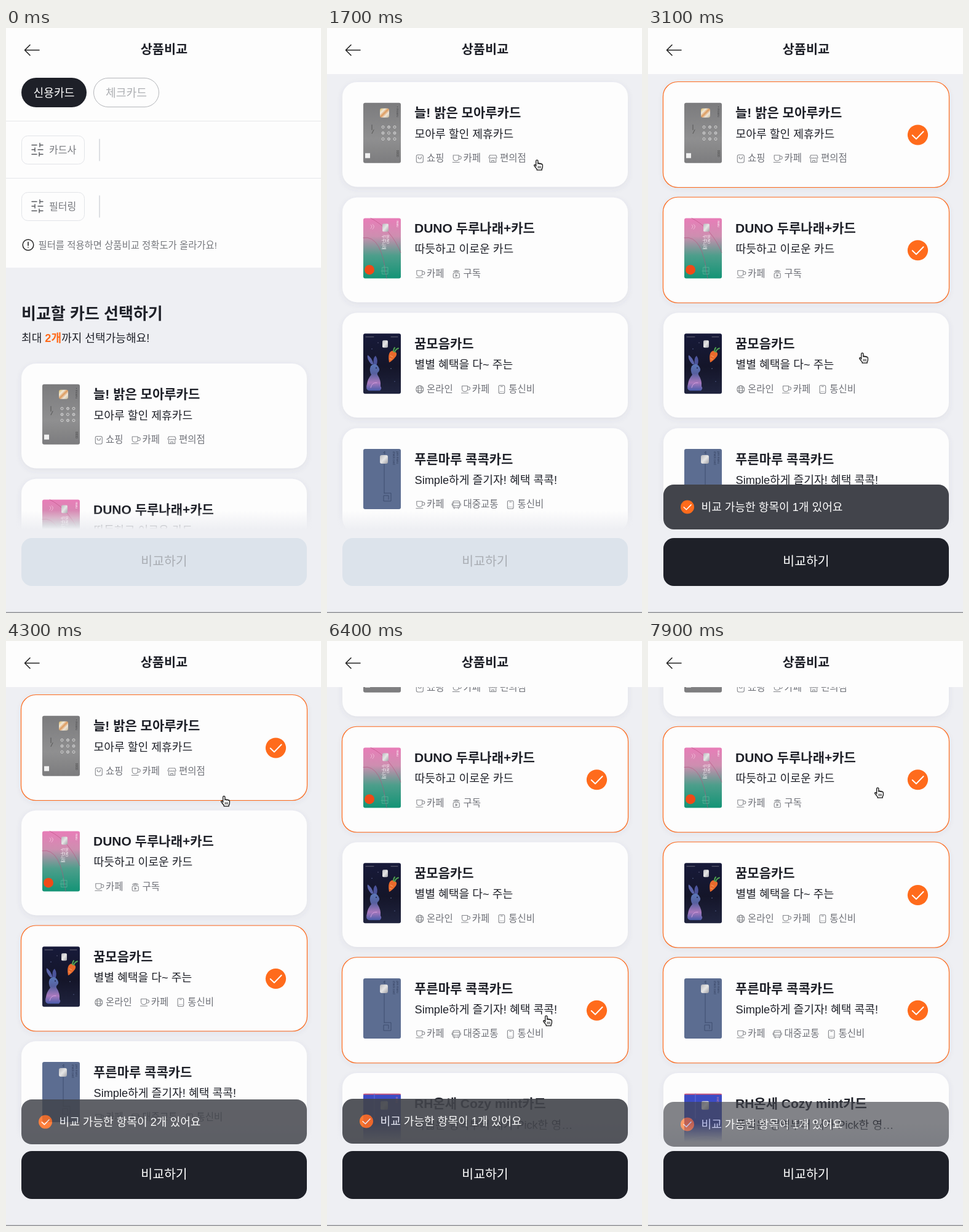
These frames come from a looping animation (512x952 px, 8000 ms). An HTML page:

```html
<!DOCTYPE html>
<html lang="ko">
<head>
<meta charset="utf-8">
<style>
html, body { margin: 0; width: 100%; height: 100%; overflow: hidden; background: #eeeff3; }
svg { display: block; width: 100vw; height: 100vh; }
text { font-family: "Liberation Sans", "Noto Sans CJK KR", "Noto Sans CJK", sans-serif; white-space: pre; }
.icon { fill: none; stroke: #85878c; stroke-width: 1.1; stroke-linecap: round; stroke-linejoin: round; }
</style>
</head>
<body>
<svg id="stage" viewBox="0 0 512 952" preserveAspectRatio="none"></svg>
<script>
const LOOP = 8000, ORANGE = '#ff6b1c', INK = '#1e2028', WHITE = '#fdfdfd', GRAY = '#eeeff3';
const CARD_TOP = 546, PITCH = 187.75;

// Text placed by its vertical centre.
const text = (x, cy, size, body, fill = INK, extra = '') =>
  `<text x="${x}" y="${cy + size * 0.37}" font-size="${size}" fill="${fill}" ${extra}>${body}</text>`;
const box = (x, y, w, h, r, fill, extra = '') =>
  `<rect x="${x}" y="${y}" width="${w}" height="${h}" rx="${r}" fill="${fill}" ${extra}/>`;
const disc = (x, y, r, fill, extra = '') => `<circle cx="${x}" cy="${y}" r="${r}" fill="${fill}" ${extra}/>`;
const shape = (d, fill) => `<path d="${d}" fill="${fill}"/>`;
const line = (d, color, width = 1) =>
  `<path d="${d}" fill="none" stroke="${color}" stroke-width="${width}" stroke-linecap="round" stroke-linejoin="round"/>`;
const mid = 'text-anchor="middle"';
const bold = 'font-weight="700"';

const check = (x, y, r) => disc(x, y, r, ORANGE) +
  line(`M${x - r * .53} ${y + r * .03}l${r * .38} ${r * .36}l${r * .7} ${-r * .72}`, '#fff', r > 14 ? 1.9 : 1.5);

const icons = {
  bag: '<rect x="-5.5" y="-6" width="11" height="12.5" rx="2.5"/><path d="M-2.5 -3v1a2.5 2.5 0 0 0 5 0v-1"/>',
  cup: '<path d="M-5 -5.500h9v5a4 4 0 0 1 -4 4h-1a4 4 0 0 1 -4 -4zM4 -4h1.500a1.500 1.500 0 0 1 0 5h-1.500M-6 6h11"/>',
  shop: '<path d="M-5 -5.500h10l1.500 4q-1.500 2.500 -3.200 0q-1.600 2.500 -3.300 0q-1.600 2.500 -3.300 0q-1.700 2.500 -3.200 0zM-5 1v5h10v-5M-1.800 6v-3h3.600v3"/>',
  sub: '<rect x="-5" y="-1.500" width="10" height="8" rx="1.500"/><path d="M-4.500 -4a5.500 4 0 0 1 9 0M-2.500 -3a3 2.500 0 0 1 5 0M-1 1v3l2.500 -1.500z"/>',
  globe: '<circle r="6"/><ellipse rx="2.700" ry="6"/><path d="M-5.500 -2h11M-5.500 2h11"/>',
  phone: '<rect x="-4.800" y="-6.500" width="9.600" height="13" rx="2"/><path d="M-1.500 -4.500h3M-2.500 3.500h.5M0 3.500h.5M2.500 3.500h.1"/>',
  bus: '<rect x="-5.500" y="-6" width="11" height="11" rx="2.500"/><path d="M-5.500 -3h11M-5.500 1.500h11M-3.500 5v1.500M3.500 5v1.500M-7 -2v3M7 -2v3M-3 3.300h.5M2.500 3.300h.5"/>'
};
const tag = { 쇼핑: 'bag', 카페: 'cup', 편의점: 'shop', 구독: 'sub', 온라인: 'globe', 통신비: 'phone', 대중교통: 'bus' };

function tagRow(names) {
  let x = 150.8, out = '';
  for (const name of names) {
    out += `<g class="icon" transform="translate(${x} 124.500)">${icons[tag[name]]}</g>`;
    out += text(x + 11.3, 123.5, 15.5, name, '#6f7178');
    x += 11.3 + name.length * 14.3 + 19.5;
  }
  return out;
}

const chip = (x, y, w, h) => box(x, y, w, h, 2, 'url(#chip)');
const side = (x, y, size, body, fill) =>
  `<text transform="translate(${x} ${y}) rotate(90)" font-size="${size}" fill="${fill}">${body}</text>`;

function metalArt() {
  let dots = '';
  for (let i = 0; i < 9; i++)
    dots += disc(32 + i % 3 * 9.5, 39.5 + Math.floor(i / 3) * 9.7, 2, i % 2 ? '#a5a5a6' : '#8b8b8c', 'stroke="#ddd" stroke-width=".9"');
  return box(0, 0, 61, 98, 3, 'url(#metal)') + box(27, 9, 15, 15, 3, 'url(#foil)') + dots +
    line('M14 36v8M17 44l-3 6', '#555') + side(54, 6, 5, '▪ moaru', '#4c4c4e') + side(54, 77, 5, '0000', '#444') +
    box(3, 82, 8, 8, 0, '#f1f1f1');
}
const sunsetArt = () => box(0, 0, 61, 98, 3, 'url(#sunset)') +
  line('M0 32Q30 26 38 98M12 0Q44 16 61 56', '#b7507f', .6) +
  chip(31, 9, 10, 13) + line('M12 11q4 2 0 6M15 10q5 3 0 8', '#f5c4df', .8) +
  side(38, 27, 5, 'DUNO', '#fff') + side(31, 27, 6.5, '두루나래', '#fff') + side(54, 4, 4.5, 'maru', '#fff') +
  line('M31 80h9v11h-9zM34 77v12M29 86h10', '#5db39b', .8) + disc(10, 84, 8, '#ef4a17');
const nightArt = () => box(0, 0, 61, 98, 3, 'url(#night)') +
  disc(14, 25, .7, '#67a') + disc(45, 57, .7, '#78a') + disc(24, 15, .6, '#88a') + disc(51, 78, .6, '#67a') +
  line('M4 5.500h13M45 5.500h11', '#667', 1) + chip(31, 11, 9, 12) +
  shape('M13 50Q5 41 7 35Q13 38 17 50Z', '#5a63a8') + shape('M17 51Q15 40 20 36Q25 43 21 53Z', '#4c549c') +
  shape('M12 53Q17 47 23 52Q28 58 25 62Q22 64 23 67Q29 76 28 86Q31 89 27 93H9Q3 91 6 82Q7 74 13 67Q9 60 12 53Z', 'url(#rabbit)') +
  disc(21, 56, 1, '#1b1d40') + line('M12 88q2 -9 10 -8', '#d9a3e0', .9) +
  shape('M42 47Q39 30 47 28Q57 30 53 37Q48 44 42 47Z', '#e96a2c') +
  line('M49 29q0-4 2-6M51 30q2-5 6-6', '#4fa653', 2) + line('M44 36l4 2M43 41l3 1', '#ffc080', .7);
const slateArt = () => box(0, 0, 61, 98, 3, '#5c6d91') + box(27, 10, 13, 14, 3, 'url(#chip)') +
  line('M33 6l2 -2v4zM34 25v47M34 72h11v13h-12v-9h8v6', '#3b4a6c', .9) +
  side(54, 4, 5, 'prn maru', '#34415f') + side(48, 4, 4.5, 'check card', '#34415f');
const cobaltArt = () => box(0, 0, 61, 98, 3, '#3d4cc4') + box(0, 0, 61, 1.5, 1, '#e0526a') +
  chip(28, 12, 12, 14) + line('M0 80Q30 62 61 76M18 0v40', '#6b75dc', .9) + side(53, 5, 5, 'cozy', '#e58aa0');

const cards = [
  ['늘! 밝은 모아루카드', '모아루 할인 제휴카드', ['쇼핑', '카페', '편의점'], metalArt],
  ['DUNO 두루나래+카드', '따듯하고 이로운 카드', ['카페', '구독'], sunsetArt],
  ['꿈모음카드', '별별 혜택을 다~ 주는', ['온라인', '카페', '통신비'], nightArt],
  ['푸른마루 콕콕카드', 'Simple하게 즐기자! 혜택 콕콕!', ['카페', '대중교통', '통신비'], slateArt],
  ['RH온새 Cozy mint카드', '폭넓은 영역부터 내가 Pick한 영…', [], cobaltArt]
];

const card = ([title, note, tags, art], i) => `<g transform="translate(0 ${CARD_TOP + i * PITCH})">` +
  box(25, 0, 464, 170.5, 24, WHITE, 'filter="url(#shadow)"') +
  `<g transform="translate(59 33.700)">${art()}</g>` +
  text(142, 49.7, 21, title, INK, bold) + text(142.5, 84, 18.2, note) + tagRow(tags) +
  `<g id="pick${i}">` + box(24.5, -.5, 465, 172, 24, WHITE, `fill-opacity="0" stroke="${ORANGE}" stroke-width="1.200"`) +
  check(438.5, 86, 16.6) + '</g></g>';

const filterRow = (y, label) => box(25.5, y, 102, 46, 10, WHITE, 'stroke="#e2e4e8"') +
  line(`M42 ${y + 15}h8M55 ${y + 15}h5M55 ${y + 12}v6M42 ${y + 22.5}h5M47 ${y + 19.5}v6M52 ${y + 22.5}h8M42 ${y + 30}h8M54 ${y + 27}v6M54 ${y + 30}h6`, '#55575c', 1.4) +
  text(70, y + 22.5, 16, label, '#77797e') + box(151, y + 5, 2, 36, 0, '#dddfe3');

const gradient = (id, stops, dir = 'x1="0" y1="0" x2="0" y2="1"') => `<linearGradient id="${id}" ${dir}>` +
  stops.map(([at, c, a = 1]) => `<stop offset="${at}" stop-color="${c}" stop-opacity="${a}"/>`).join('') + '</linearGradient>';
const slant = 'x1="0" y1="0" x2="1" y2="1"';

document.getElementById('stage').innerHTML = '<defs>' +
  gradient('metal', [[0, '#7b7b7d'], [.6, '#8f8f90'], [1, '#7c7c7e']]) +
  gradient('foil', [[0, '#d9b45c'], [.3, '#f0eadb'], [.5, '#dd9a5c'], [.7, '#eee6da'], [1, '#c9b894']], slant) +
  gradient('chip', [[0, '#b9b9be'], [.5, '#e6e6e6'], [1, '#a2a2a8']], slant) +
  gradient('sunset', [[0, '#e87db8'], [.3, '#ce8eb0'], [.62, '#4d9e8b'], [1, '#139476']]) +
  gradient('night', [[0, '#171a3a'], [.55, '#141529'], [1, '#20243f']]) +
  gradient('rabbit', [[0, '#5b78b8'], [.35, '#56609f'], [.7, '#a879bd'], [1, '#4a5cab']]) +
  gradient('fade', [[0, GRAY, 0], [1, GRAY]]) +
  '<filter id="shadow" x="-5%" y="-10%" width="110%" height="125%"><feDropShadow dx="0" dy="3" stdDeviation="5" flood-color="#525a70" flood-opacity=".09"/></filter></defs>' +
  box(0, 0, 512, 952, 0, GRAY) +
  '<g id="list">' + box(0, 0, 512, 390, 0, WHITE) +
  box(25, 81, 106, 48, 24, INK) + text(78, 105, 18.2, '신용카드', '#fff', mid) +
  box(142.5, 81.5, 106, 47, 23.5, WHITE, 'stroke="#b4b6ba"') + text(195.5, 105, 18.2, '체크카드', '#adafb3', mid) +
  box(0, 151, 512, 1, 0, '#e6e7ea') + box(0, 244, 512, 1, 0, '#e6e7ea') +
  filterRow(175.5, '카드사') + filterRow(267.5, '필터링') +
  disc(36, 353, 8.8, 'none', 'stroke="#222" stroke-width="1.500"') + line('M36 348.500v5.500M36 357v.1', '#222', 1.6) +
  text(52.5, 353.5, 15.4, '필터를 적용하면 상품비교 정확도가 올라가요!', '#76787d') +
  text(25, 464.5, 26, '비교할 카드 선택하기', INK, bold) +
  text(25, 504, 18.1, `최대 <tspan fill="${ORANGE}" font-weight="700">2개</tspan>까지 선택가능해요!`) +
  cards.map(card).join('') + '</g>' +
  box(0, 0, 512, 75, 0, WHITE) + line('M30.500 36H54M39 27.500L30.500 36L39 44.500', '#222', 1.6) +
  text(257, 34.5, 20.8, '상품비교', INK, mid + ' ' + bold) +
  box(0, 785, 512, 30.5, 0, 'url(#fade)') + box(0, 815, 512, 137, 0, GRAY) +
  box(25, 830, 464, 78, 17, '#dce3eb', 'id="button"') +
  text(257, 867.5, 20.5, '비교하기', '#a9adb3', mid + ' id="label"') +
  '<g id="toast">' + box(25, 743, 464, 73, 17, '#42444b') + check(64, 779.5, 11) +
  text(86.5, 779.5, 18.1, '', '#fff', 'id="message"') + '</g>' +
  box(0, 950.5, 512, 1.5, 0, '#8f9094') +
  '<g id="cursor"><path d="M4.700 11V2.400a1.600 1.600 0 0 1 3.200 0V7.200q0-1.200 1.300-1.200t1.300 1.400q.2-1 1.400-.9t1.300 1.400q.2-.8 1.100-.6t1.100 1.500V12q0 2-1.200 3.300V17.200H6.200V15.600Q4.400 13.600 2.900 11.600q-1.900-2.200-.9-2.900 1-.7 2.700 1.200Z" fill="#fff" stroke="#111" stroke-width="1.300" stroke-linejoin="round"/>' +
  line('M8.200 11v3M10.200 11v3M12.200 11v3', '#111', .9) + '</g>';

const el = id => document.getElementById(id);

// Click time, card, whether the toast slides in again.
const clicks = [[2250, 0, 0], [2680, 1, 1], [3250, 2, 1], [4130, 0, 1], [4720, 1, 0], [6205, 3, 1], [6900, 2, 1], [7786, 1, 1]];
const DROP_DELAY = 150;

// Time, x, y of the pointer.
const path = [[900, 530, 430], [1600, 343, 223], [1750, 343, 223], [2150, 350, 190], [2300, 350, 190], [2620, 352, 362], [2720, 352, 362],
  [3080, 350, 537], [3350, 350, 537], [4020, 356, 195], [4150, 356, 195], [4450, 356, 325], [4680, 352, 368], [4780, 352, 368],
  [5180, 343, 566], [5900, 343, 566], [6150, 358, 618], [6430, 358, 618], [6820, 362, 430], [7000, 362, 430], [7600, 375, 247]];

const span = (t, a, b) => Math.min(1, Math.max(0, (t - a) / (b - a)));
const smooth = k => k * k * (3 - 2 * k);

function pointer(t) {
  const next = path.findIndex(p => p[0] > t);
  if (next === 0) return [-50, -50];
  if (next < 0) return path[path.length - 1].slice(1);
  const [t0, x0, y0] = path[next - 1], [t1, x1, y1] = path[next];
  const k = smooth(span(t, t0, t1));
  return [x0 + (x1 - x0) * k, y0 + (y1 - y0) * k];
}

// Two picks are kept; the oldest leaves shortly after a new one.
const picked = (t, i) => clicks.some(([at, c], n) => c === i && at <= t &&
  !(clicks[n + 2] && clicks[n + 2][0] + DROP_DELAY <= t));

function render(t) {
  const scroll = 458 * smooth(span(t, 760, 1580)) + 136 * smooth(span(t, 5320, 6080));
  el('list').setAttribute('transform', `translate(0 ${-scroll})`);
  cards.forEach((_, i) => el('pick' + i).setAttribute('visibility', picked(t, i) ? 'visible' : 'hidden'));

  const active = t >= clicks[1][0];
  el('button').setAttribute('fill', active ? INK : '#dce3eb');
  el('label').setAttribute('fill', active ? '#fff' : '#a9adb3');

  const shown = clicks.filter(c => c[2] && c[0] <= t).pop();
  const rise = shown ? 1 - (1 - span(t, shown[0], shown[0] + 300)) ** 2.2 : 0;
  el('toast').setAttribute('opacity', rise);
  el('toast').setAttribute('transform', `translate(0 ${20 * (1 - rise)})`);
  const count = t >= clicks[3][0] && t < clicks[4][0] ? 2 : 1;
  el('message').textContent = `비교 가능한 항목이 ${count}개 있어요`;

  const [x, y] = pointer(t);
  el('cursor').setAttribute('transform', `translate(${x - 8} ${y - 9})`);
}

const start = performance.now();
function tick() {
  render((performance.now() - start) % LOOP);
  requestAnimationFrame(tick);
}
tick();
</script>
</body>
</html>
```
